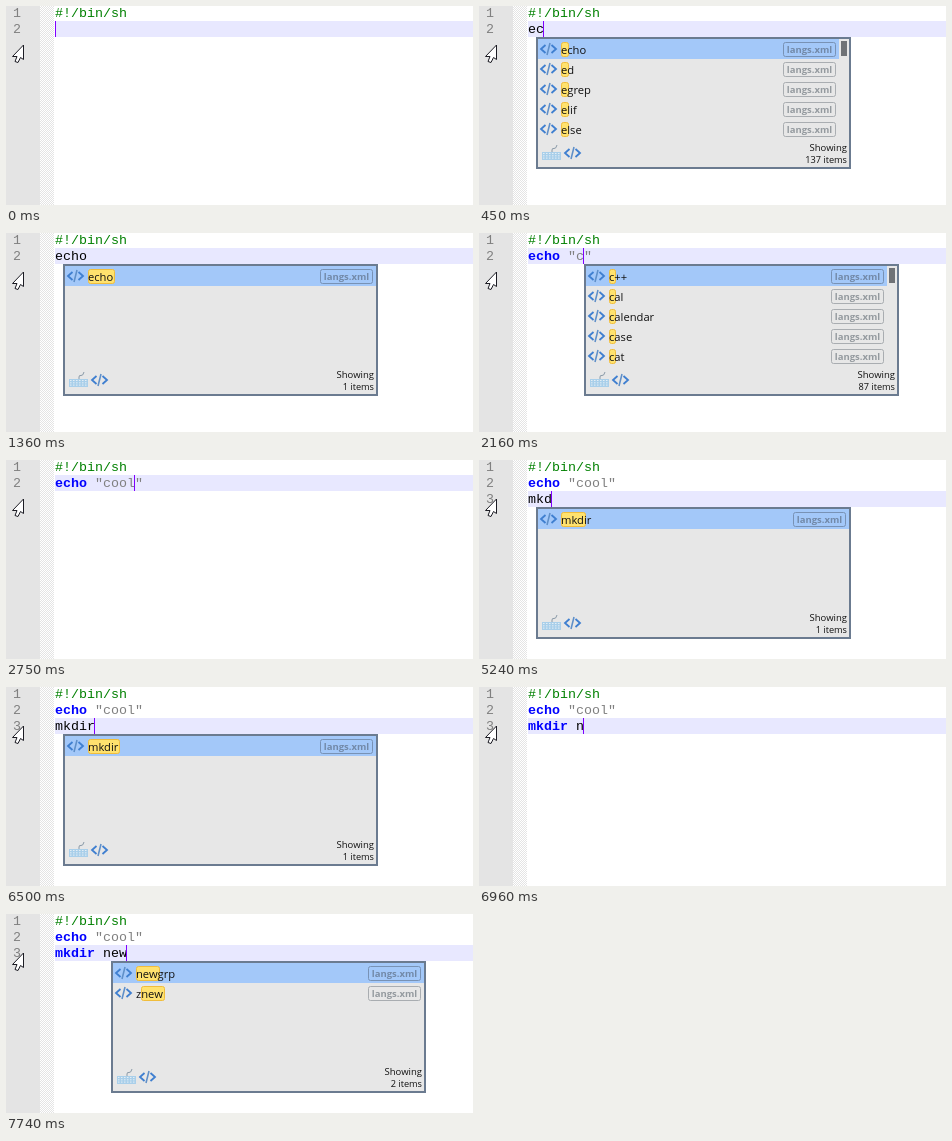
Animation of 467x199 px, one loop 8 s. Source, as an HTML page with a canvas:

```html
<!DOCTYPE html>
<html lang="en">
<head>
<meta charset="utf-8">
<title>Shell script autocompletion</title>
<style>
  html, body { margin: 0; width: 100%; height: 100%; overflow: hidden; background: #fff; }
  canvas { display: block; }
</style>
</head>
<body>
<canvas id="stage" width="467" height="199"></canvas>
<script>
const ctx = document.getElementById('stage').getContext('2d');
const LOOP = 8000, LEFT = 49, CHAR = 8, LINE = 16;
const MONO = '13.333px "Liberation Mono", monospace';
const SANS = '"Open Sans", sans-serif';

// What the popup offers for each query: total count, then the visible words.
const MATCHES = {
  e: [137, 'echo', 'ed', 'egrep', 'elif', 'else'],
  ec: [3, 'echo', 'declare', 'exec'],
  ech: [1, 'echo'],
  echo: [1, 'echo'],
  c: [87, 'c++', 'cal', 'calendar', 'case', 'cat'],
  co: [12, 'col', 'comm', 'compress', 'continue', 'iconv'],
  m: [58, 'm4', 'mail', 'mailx', 'make', 'man'],
  mk: [3, 'mkdir', 'mkfifo', 'mknod'],
  mkd: [1, 'mkdir'],
  mkdi: [1, 'mkdir'],
  mkdir: [1, 'mkdir'],
  n: [96, 'newgrp', 'nice', 'nl', 'nm', 'nohup'],
  ne: [8, 'newgrp', 'netstat', 'banner', 'done', 'line'],
  new: [2, 'newgrp', 'znew']
};

// Start time, text after the first line ("|" is a visible caret), popup query.
const DONE = 'echo "cool"\n';
const STEPS = [
  [0, '|'], [130, 'e|'], [280, 'e|', 'e'], [430, 'ec|', 'e'], [580, 'ec|', 'ec'], [730, 'ec', 'ec'],
  [1040, 'ech|', 'ec'], [1200, 'ech|', 'ech'], [1360, 'echo', 'echo'], [1510, 'echo |'],
  [1840, 'echo "|"'], [2160, 'echo "c|"', 'c'], [2300, 'echo "co|"', 'c'], [2440, 'echo "co|"', 'co'],
  [2750, 'echo "cool|"'], [2900, 'echo "cool"'], [3230, 'echo "cool|"'], [3530, 'echo "cool"|'],
  [3840, 'echo "cool"'], [3990, DONE], [4140, DONE + '|'], [4450, DONE], [4600, DONE + '|'],
  [4770, DONE + 'm|', 'm'], [5090, DONE + 'mk|', 'mk'], [5240, DONE + 'mkd|', 'mkd'],
  [5390, DONE + 'mkdi|', 'mkdi'], [5700, DONE + 'mkdi', 'mkdi'], [5860, DONE + 'mkdir|', 'mkdi'],
  [6010, DONE + 'mkdir|', 'mkdir'], [6170, DONE + 'mkdir', 'mkdir'], [6500, DONE + 'mkdir|', 'mkdir'],
  [6630, DONE + 'mkdir |'], [6960, DONE + 'mkdir n|'], [7110, DONE + 'mkdir n|', 'n'],
  [7260, DONE + 'mkdir ne|', 'n'], [7410, DONE + 'mkdir ne|', 'ne'], [7740, DONE + 'mkdir new|', 'new']
];

function rect(x, y, w, h, color) {
  ctx.fillStyle = color;
  ctx.fillRect(x, y, w, h);
}

function text(str, x, y, color, font, align = 'left') {
  ctx.font = font;
  ctx.fillStyle = color;
  ctx.textAlign = align;
  ctx.fillText(str, x, y);
}

function box(x, y, w, h, stroke, fill) {
  ctx.beginPath();
  ctx.roundRect(x + 0.5, y + 0.5, w - 1, h - 1, 2);
  if (fill) { ctx.fillStyle = fill; ctx.fill(); }
  ctx.strokeStyle = stroke;
  ctx.lineWidth = 1;
  ctx.stroke();
}

function stroke(path, x, y, color, width) {
  ctx.save();
  ctx.translate(x, y);
  ctx.strokeStyle = color;
  ctx.lineWidth = width;
  ctx.stroke(new Path2D(path));
  ctx.restore();
}

function codeIcon(x, y) {
  stroke('M5.5-4L1 0L5.5 4M11.5-4L16 0L11.5 4', x, y, '#3f7fd0', 1.8);
  stroke('M10-6L7 6', x, y, '#5f8fc8', 1.5);
}

function keyboardIcon(x, y) {
  stroke('M10 6V4Q10 2 12 2.5T15-1', x, y, '#8a9aa8', 1);
  rect(x, y + 6, 19, 8, '#a9cfea');
  for (let row = 0; row < 3; row++)
    for (let col = 0; col < 6; col++) rect(x + 1 + col * 3, y + 7 + row * 2.3, 1.5, 1, '#e4eef5');
}

function pointer() {
  const arrow = new Path2D('M17.5 39V53.5L14.5 51.5L12 56.5L9 55.5L11 50.5H6.5Z');
  ctx.fillStyle = '#fff';
  ctx.fill(arrow);
  ctx.strokeStyle = '#1c1c24';
  ctx.lineWidth = 1;
  ctx.stroke(arrow);
}

function popup(x, y, query) {
  const [count, ...words] = MATCHES[query];
  const w = 315, h = 132, scroll = count > 5;
  const right = x + w - (scroll ? 15 : 5);
  rect(x, y, w, h, '#6b7b90');
  rect(x + 2, y + 2, w - 4, h - 4, '#e7e7e7');
  rect(x + 2, y + 2, w - (scroll ? 14 : 4), 20, '#a3c8f9');
  if (scroll) rect(x + 305, y + 4, 6, Math.max(15, 490 / count), '#6f7276');

  words.forEach((word, i) => {
    const top = y + 2 + i * 20, font = '11.2px ' + SANS, start = word.indexOf(query);
    codeIcon(x + 4, top + 10);
    ctx.font = font;
    const before = ctx.measureText(word.slice(0, start)).width;
    const marked = ctx.measureText(query).width;
    box(Math.round(x + 24.5 + before), top + 3, Math.round(marked + 2), 15, '#f0bd3c', '#ffe26e');
    text(word, x + 25, top + 15, '#111', font);
    box(right - 53, top + 3, 53, 15, i ? '#a9adb1' : '#7892b5');
    text('langs.xml', right - 26.5, top + 14, i ? '#949a9f' : '#7289a8', 'bold 9.5px ' + SANS, 'center');
  });

  keyboardIcon(x + 6, y + 109);
  codeIcon(x + 28, y + 116);
  text('Showing', x + 311, y + 114, '#111', '9.5px ' + SANS, 'right');
  text(count + ' items', x + 311, y + 126, '#111', '9.2px ' + SANS, 'right');
}

function codeLine(line, y) {
  const [, command, rest] = line.match(/^(\w+(?= ))?(.*)$/);
  if (command) text(command, LEFT, y, '#0000ff', 'bold ' + MONO);
  const color = rest.includes('"') ? '#808080' : '#000';
  text(rest, LEFT + CHAR * (command || '').length, y, color, MONO);
}

function draw([, source, query]) {
  const lines = source.split('\n'), last = lines.length - 1;
  const top = 15 + LINE * last;
  rect(0, 0, 467, 199, '#fff');
  rect(0, 0, 34, 199, '#e4e4e4');
  for (let y = 0; y < 199; y++)
    for (let x = 35 - y % 2; x < 48; x += 2) rect(x, y, 1, 1, '#e4e4e4');
  rect(LEFT, top, 467 - LEFT, LINE, '#e8e8ff');

  for (let i = 0; i <= last + 1; i++) text(i + 1, 7, 11 + LINE * i, '#808080', MONO);
  text('#!/bin/sh', LEFT, 11, '#008000', MONO);
  lines.forEach((line, i) => codeLine(line.replace('|', ''), 27 + LINE * i));

  const caret = lines[last].indexOf('|');
  if (caret >= 0) rect(Math.max(LEFT, LEFT - 1 + CHAR * caret), top, 1, LINE, '#8000ff');
  if (query) popup(lines[last].includes(' ') ? 105 : 57, top + LINE, query);
  pointer();
}

let shown;
function tick() {
  const time = performance.now() % LOOP;
  const step = STEPS.findLast(s => s[0] <= time);
  if (step !== shown) draw(shown = step);
  requestAnimationFrame(tick);
}
tick();
</script>
</body>
</html>
```
